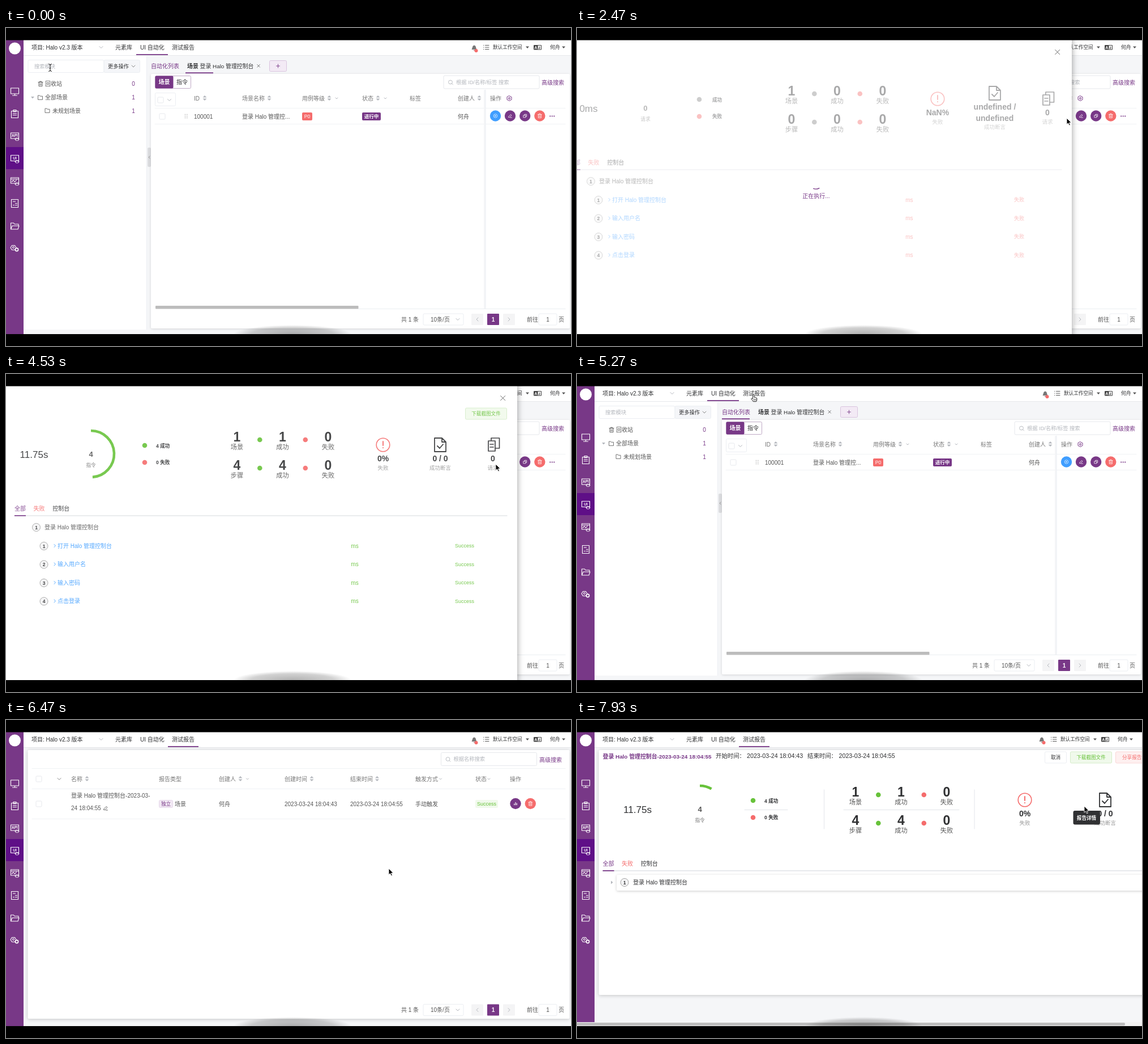
An HTML page that plays this animation: 998x561 px, repeating every 8 s.

```html
<!DOCTYPE html>
<html lang="zh-CN">
<head>
<meta charset="utf-8">
<title>UI 自动化</title>
<style>
html, body { margin: 0; height: 100%; overflow: hidden; background: #000; }
svg { display: block; width: 100vw; height: 100vh; font-family: "Liberation Sans", "Noto Sans CJK SC", "Noto Sans CJK", sans-serif; }
text { white-space: pre; }
</style>
</head>
<body>
<svg id="stage" viewBox="0 0 998 561"></svg>
<script>
const PURPLE = '#783887', RED = '#f56c6c', GREEN = '#67c23a', BLUE = '#409eff';
const DARK = '#303133', TEXT = '#555', HEAD = '#777', PALE = '#b4b7bd', LINE = '#ebeef2';
const MID = ' text-anchor="middle"', BOLD = ' font-weight="700"';
const USER = '何舟';

// Drawing helpers; text is placed by its vertical centre.
const text = (x, y, s, fill = TEXT, size = 10, more = '') =>
  `<text x="${x}" y="${y + size * .37}" fill="${fill}" font-size="${size}"${more}>${s}</text>`;
const rect = (x, y, w, h, fill, stroke = 'none', r = 0, more = '') =>
  `<rect x="${x}" y="${y}" width="${w}" height="${h}" rx="${r}" fill="${fill}" stroke="${stroke}" ${more}/>`;
const dot = (x, y, r, fill, stroke = 'none', w = 1) =>
  `<circle cx="${x}" cy="${y}" r="${r}" fill="${fill}" stroke="${stroke}" stroke-width="${w}"/>`;
const line = (d, stroke = LINE, w = 1) =>
  `<path d="${d}" fill="none" stroke="${stroke}" stroke-width="${w}" stroke-linecap="round" stroke-linejoin="round"/>`;
const at = (x, y, s) => `<g transform="translate(${x} ${y})">${s}</g>`;
const group = (id, s) => `<g id="${id}">${s}</g>`;
const fillPath = (d, fill) => `<path d="${d}" fill="${fill}"/>`;

const chevron = (x, y, c = PALE, r = 3) => line(`M${x - r} ${y - r / 2}l${r} ${r}l${r} ${-r}`, c);
const caret = (x, y) => fillPath(`M${x - 3} ${y - 1.5}h6l-3 3.5z`, '#555');
const sort = (x, y) => fillPath(`M${x - 3.5} ${y - 1}l3.5 -3.5l3.5 3.5zM${x - 3.5} ${y + 1}l3.5 3.5l3.5 -3.5z`, PALE);
const check = (x, y) => rect(x - 5, y - 5, 10, 10, '#fff', '#e6e8ec', 1.5);
const glass = (x, y) => dot(x, y, 3.4, 'none', PALE, .9) + line(`M${x + 2.5} ${y + 2.5}l2 2`, PALE, .9);
const trash = (c, w = .9) => line('M-4 -2.8h8M-1.5 -2.8v-1.5h3v1.5M-3 -2.8v7h6v-7M-1 -.5v2.6M1 -.5v2.6', c, w);
const folder = c => line('M-4 3.5v-7h3l1 1.3h4v5.7z', c, .9);
const pencil = c => line('M-3 1.2l4.2-4.2l1.8 1.8l-4.2 4.2h-1.8zM0 3.5h3.5', c, .9);
const copies = c => line('M-3 -1.2h4.5v4.5h-4.5zM-1 -1.2v-2h4.5v4.5h-2', c, .9);
const play = c => dot(0, 0, 3.8, 'none', c, .8) + fillPath('M-1 -1.8l2.8 1.8l-2.8 1.8z', c);
const bars = c => line('M-2.6 2.6v-2M0 2.6v-5M2.6 2.6v-3.2', c, 1.4);
const button = (x, y, c, icon) => at(x, y, dot(0, 0, 9.7, c) + `<g transform="scale(.85)">${icon('#fff')}</g>`);
const field = (x, y, w, hint) => rect(x, y, w, 23, '#fff', '#e6e8ec', 2) + glass(x + 12, y + 11.5) +
  text(x + 22, y + 11.5, hint, PALE, 9.25);
const heads = (y, list) => list.map(([x, s]) => text(x, y, s, HEAD, 10, ' font-weight="500"')).join('');

function sidebar() {
  const win = 'M-7 -6h14v10h-14zM-7 -3.5h14', code = 'M3 3l-2.5 2.3l2.5 2.3M5 3l2.5 2.3l-2.5 2.3';
  const icons = [
    'M-7 -6h14v10h-14zM-4 7h8M0 4v3',
    'M-6 -5h12v12h-12zM-2.5 -7h5v3h-5zM-3 -1h6M-3 2h6',
    win + code, win + code,
    win + 'M-5 1l2.5 -2.5l2.5 3l3 -3.5' + code,
    'M-6 -7h12v14h-12zM-3 -3.5h4M-3 3h2M1 0h3M1 3h3',
    'M-7 6v-11h5l1.5 2h7v3M-7 6l2.5 -6h12l-2 6z',
    'M-5 -5h5l2.5 4l-2.5 4h-5l-2.5 -4z'
  ];
  const tags = [, , 'API', 'UI'];
  return rect(0, 21, 31, 519, PURPLE) + rect(0, 210, 31, 39, '#5f0f87') + dot(15.5, 36, 10.5, '#fff') +
    icons.map((d, i) => at(15.5, 112 + i * 39.5, line(d, '#fff', 1.1) +
      (tags[i] ? rect(-6, -4.5, 12, 6, i === 3 ? '#5f0f87' : PURPLE) + text(0, -1, tags[i], '#fff', 6.5, MID + BOLD) : ''))).join('') +
    dot(13, 387, 1.6, 'none', '#fff') + dot(19, 391, 2.6, 'none', '#fff', 1.6);
}

function header() {
  const account = at(827, 35, fillPath('M-4.5 3c1.5-2 1-7 4.5-7.5c3.5.5 3 5.5 4.5 7.5zM-1.5 4h3l-1.5 1.5z', '#777') + dot(3.5, 5, 3, RED)) +
    line('M846.5 30.5h6.5M846.5 34h6.5M846.5 37.5h6.5M843.5 30.5h.4M843.5 34h.4M843.5 37.5h.4', '#555') +
    text(860, 34, '默认工作空间', DARK, 8.6) + caret(921, 34) +
    rect(932, 30, 14, 8.5, '#444', 'none', 1) + text(935.8, 34.3, 'A', '#fff', 7, MID + BOLD) +
    rect(939.5, 31, 5.5, 6.5, '#fff') + text(942.3, 34.3, 'Z', '#444', 6, MID + BOLD) +
    text(961, 34, USER, DARK, 8.8) + caret(985, 34);
  return rect(31, 21, 967, 27.5, '#fff') + line('M31 48.5h967', '#e6e8eb') +
    text(45, 34.5, '项目: Halo v2.3 版本', DARK) + chevron(168, 34) +
    text(193, 34, '元素库', DARK) + text(237, 34, 'UI 自动化', DARK) + text(293, 34, '测试报告', DARK) +
    `<rect id="navLine" y="46" height="1.8" fill="${PURPLE}"/>` + group('account', account);
}

function pager(y) {
  return at(0, y, text(698, 0, '共 1 条') + rect(737, -10, 71, 20, '#fff', LINE, 2) + text(750, 0, '10条/页') + chevron(798, 0) +
    rect(822, -10, 21, 20, '#f4f4f5', 'none', 1) + line('M834 -3l-3 3l3 3', PALE) +
    rect(850, -10, 21, 20, PURPLE, 'none', 1) + text(860.5, 0, '1', '#fff', 10, MID + BOLD) +
    rect(878, -10, 21, 20, '#f4f4f5', 'none', 1) + line('M887 -3l3 3l-3 3', PALE) +
    text(920, 0, '前往') + rect(941, -10, 32, 20, '#fff', LINE, 2) + text(957, 0, '1', TEXT, 10, MID) + text(976, 0, '页'));
}

function listPage() {
  const tree = rect(31, 49, 217, 483, '#fff') + line('M248.5 49v483') +
    rect(39, 56.5, 134, 22, '#fff', LINE, 2) + text(50, 67.5, '搜索模块', PALE, 9.25) +
    rect(173, 56.5, 63.5, 22, '#f5f6f9', LINE, 2) + text(180, 67.5, '更多操作', DARK, 9.25) + chevron(225, 67.5, '#888') +
    at(61, 98.5, trash('#555')) + text(69, 98.5, '回收站') + fillPath('M44 121h6l-3 3.5z', PALE) +
    at(60.5, 122.5, folder('#666')) + text(69, 122.5, '全部场景') + at(73, 145.5, folder('#666')) + text(82, 146, '未规划场景') +
    [[98.5, 0], [122.5, 1], [146, 1]].map(([y, n]) => text(225, y, n, PURPLE, 10, MID)).join('') +
    rect(250, 211, 6, 34, '#dcdde0', 'none', 2) + line('M254 226l-2 2l2 2', '#999');
  const top = text(256, 67, '自动化列表', PURPLE, 10, ' font-weight="500"') +
    text(320, 67, `<tspan font-weight="700">场景</tspan> 登录 Halo 管理控制台`, DARK, 9.9) +
    line('M443.8 64.5l4.6 4.6m0 -4.6l-4.6 4.6', '#666', .9) +
    rect(465.5, 57.5, 30, 19, '#f3eaf5', '#d9c4de', 2) + line('M477.5 67h6M480.5 64v6', PURPLE, .9);
  const table = rect(256, 81, 740, 449, '#fff', 'none', 2, 'style="filter:drop-shadow(0 1px 2px #0002)"') +
    `<rect id="tabLine" y="78.3" width="49" height="1.8" fill="${PURPLE}"/>` +
    rect(263.5, 84.5, 63, 22, '#fff', '#bfaac5', 2) + rect(263.5, 84.5, 32, 22, PURPLE, 'none', 2) +
    text(269.5, 95.5, '场景', '#fff', 10, BOLD) + text(301, 95.5, '指令', DARK) +
    field(773, 84, 169, '根据 ID/名称/标签 搜索') + text(946, 96.5, '高级搜索', PURPLE) +
    rect(263.5, 114.5, 36, 23, '#fff', LINE, 2) + check(273, 127) + chevron(288.5, 127) +
    heads(124, [[332, 'ID'], [417, '场景名称'], [523, '用例等级'], [629, '状态'], [713, '标签'], [798, '创建人'], [855, '操作']]) +
    [351, 465, 571, 657, 836].map(x => sort(x, 123.5)).join('') + chevron(584, 124, PALE, 2) + chevron(670, 124, PALE, 2) +
    line('M889 119.7l4 2.2v4.4l-4 2.2l-4 -2.2v-4.4z', PURPLE) + dot(889, 124.1, 1.5, 'none', PURPLE) +
    line('M263 141.5h725M263 169.5h725', '#f0f2f5') + check(276, 156) +
    [0, 1, 2].map(i => dot(316.5, 152.5 + i * 3, .8, '#aaa') + dot(319.8, 152.5 + i * 3, .8, '#aaa')).join('') +
    text(332, 156, '100001') + text(417, 156, '登录 Halo 管理控...') +
    rect(523, 149, 18, 14, RED, 'none', 2) + text(532, 156, 'P0', '#fff', 8.5, MID) +
    rect(629, 149, 33, 14, PURPLE, 'none', 2) + text(645.5, 156, '进行中', '#fff', 8.5, MID + BOLD) + text(798, 156, USER) +
    rect(844, 109, 3, 386, '#f4f5f7') + line('M847 109v386', LINE) +
    button(864.5, 155, BLUE, play) + button(890.5, 155, PURPLE, pencil) + button(916.7, 155, PURPLE, copies) + button(942.8, 155, RED, trash) +
    [-3.5, 0, 3.5].map(d => dot(964.7 + d, 155.5, 1.1, PURPLE)).join('') +
    line('M622 495.5h366') + rect(264, 490, 358.5, 5.5, '#bcbcbc', 'none', 1) + pager(514);
  return tree + top + table;
}

function reportPage() {
  return rect(38.5, 53, 957, 474, '#fff', 'none', 2, 'style="filter:drop-shadow(0 1px 3px #0003)"') +
    field(768.5, 57.5, 169, '根据名称搜索') + text(942, 70, '高级搜索', PURPLE) + line('M46 85.5h942M46 121.5h942M46 174.5h942', '#f0f2f5') +
    check(58, 104) + chevron(94, 104, '#888') + check(58, 148) +
    heads(104, [[115, '名称'], [270, '报告类型'], [376, '创建人'], [492, '创建时间'], [608, '结束时间'], [723, '触发方式'], [829, '状态'], [890, '操作']]) +
    [143, 414, 540, 655.5].map(x => sort(x, 103.5)).join('') + [426.5, 767.5, 853].map(x => chevron(x, 104, PALE, 2)).join('') +
    text(115, 133.5, '登录 Halo 管理控制台-2023-03-') + text(115, 155.5, '24 18:04:55') + at(176, 155.5, pencil('#555')) +
    rect(270.5, 141.5, 24, 13, '#f2e9f4', '#e6d7ea', 2) + text(282.5, 148, '独立', PURPLE, 8.6, MID) + text(298, 148, '场景') +
    text(376, 148, USER) + text(492, 148, '2023-03-24 18:04:43') + text(608, 148, '2023-03-24 18:04:55') + text(723, 148, '手动触发') +
    rect(829, 141, 40, 14, '#f0f9eb', 'none', 2) + text(849, 148, 'Success', GREEN, 9, MID) +
    button(900, 147.5, PURPLE, bars) + button(926.3, 147.5, RED, trash) + pager(511.5);
}

// Summary strip shared by the drawer and the report; y is the middle of the ring.
function summary(y, [xTime, xRing, xKey, xStat, xFail, xFile], v) {
  const mark = v.total ? GREEN : '#888';
  const stat = (x, dy, n, label) => text(x, y + dy, n, DARK, 23, MID + BOLD) + text(x, y + dy + 19, label, TEXT, 11.2, MID);
  const row = (dy, all, name) => stat(xStat, dy, all, name) + stat(xStat + 80.5, dy, v.total && all, '成功') + stat(xStat + 161, dy, 0, '失败') +
    dot(xStat + 40.3, y + dy + 6, 4.3, mark) + dot(xStat + 120.8, y + dy + 6, 4.3, RED);
  const note = (x, dy, s) => text(x, y + dy, s, '#999', 9.5, MID);
  const big = (x, dy, s) => text(x, y + dy, s, DARK, 14, MID + BOLD);
  return text(xTime, y + .5, v.time, DARK, 17, MID) + text(xRing, y, v.total, TEXT, 13, MID + BOLD) + text(xRing, y + 19.5, v.unit, '#777', 8.6, MID) +
    dot(xKey, y - 15, 4.3, mark) + dot(xKey, y + 15, 4.3, RED) + text(xKey + (v.total ? 20 : 23), y - 14.5, v.good, DARK, 8.6, BOLD) +
    text(xKey + (v.total ? 20 : 23), y + 15, v.bad, DARK, 8.6, BOLD) + row(-31, 1, '场景') + row(19, v.steps, '步骤') +
    at(xFail, y - 16, dot(0, 0, 11.8, 'none', RED, 1.6) + line('M0 -6v7M0 5v.3', RED, 2)) + big(xFail, 8, v.rate) + note(xFail, 24, '失败') +
    at(xFile, y - (v.total ? 16 : 26), line('M-10 -12h13l7 7v17h-20zM3 -12v7h7M-5 2l4 4l6 -7', DARK, 1.8)) +
    v.asserts.map((s, i) => big(xFile, i * 20 + (v.total ? 8 : -2), s)).join('') + note(xFile, v.total ? 24 : 33, '成功断言');
}

const ringPath = (x, y) => `<path class="ring" data-x="${x}" data-y="${y}" fill="none" stroke="${GREEN}" stroke-width="4.6"/>`;
const badge = (x, y, n) => dot(x, y, 7, '#f4f4f5', '#999', .9) + text(x, y, n, DARK, 8.5, MID + BOLD);
const tabs = (x, y, w) => text(x, y, '全部', PURPLE) + text(x + 33.5, y, '失败', RED) + text(x + 67.3, y, '控制台', DARK) +
  line(`M${x} ${y + 13}h${w}`, '#dfe2e6', 1.5) + rect(x, y + 12, 20, 1.8, PURPLE);
const DONE = { time: '11.75s', total: 4, unit: '指令', good: '4 成功', bad: '0 失败', steps: 4, rate: '0%', asserts: ['0 / 0'] };
const WAIT = { time: '0ms', total: 0, unit: '请求', good: '成功', bad: '失败', steps: 0, rate: 'NaN%', asserts: ['undefined /', 'undefined'] };

function drawerBody(v) {
  const steps = ['打开 Halo 管理控制台', '输入用户名', '输入密码', '点击登录'];
  return summary(141, [49.5, 150, 245, 408, 666, 767], v) +
    line('M852 118h12v18h-12zM857 118v-5h14.5v18h-7M855 124h6M855 129h6', DARK, 1.7) +
    text(860, 149, 0, DARK, 14, MID + BOLD) + text(860, 165, '请求', '#999', 9.5, MID) +
    tabs(15, 237, 870) + badge(53.5, 270.5, 1) + text(68, 270, '登录 Halo 管理控制台') +
    steps.map((s, i) => {
      const y = 303 + i * 32.5;
      return badge(67, y + .5, i + 1) + line(`M85 ${y - 2.5}l2.5 2.5l-2.5 2.5`, BLUE) + text(91, y, s, BLUE) +
        text(616, y, 'ms', v.total ? GREEN : RED, 10, MID) + text(810, y, v.total ? 'Success' : '失败', v.total ? GREEN : RED, 9, MID);
    }).join('') + (v.total ? ringPath(150, 141) + greenButton(811, 60) : '');
}
function greenButton(x, y) {
  return rect(x + .5, y, 73, 20, '#f0f9eb', '#d5ecc9', 2) + text(x + 37, y + 10, '下载截图文件', GREEN, 8.6, MID);
}

function detailPage() {
  const date = '2023-03-24 18:04:';
  return rect(38.5, 53, 980, 432, '#fff', 'none', 2, 'style="filter:drop-shadow(0 1px 3px #0003)"') +
    text(45.5, 64, `登录 Halo 管理控制台-${date}55`, PURPLE, 9.9, BOLD) +
    text(245, 63.5, '开始时间：', DARK, 10.4) + text(300, 63.5, date + 43, DARK, 10.7) +
    text(407, 63.5, '结束时间：', DARK, 10.4) + text(462.5, 63.5, date + 55, DARK, 10.7) +
    rect(826.5, 56, 38, 20, '#fff', LINE, 2) + text(845.5, 66, '取消', DARK, 8.6, MID) + greenButton(871, 56) +
    rect(951.5, 56, 60, 20, '#fef0f0', '#fad6d6', 2) + text(963, 66, '分享报告', RED, 8.6) +
    line('M296 158.5h76M471 158.5h204M436.5 123v69M702 123v69', '#e2e5ea') +
    summary(157, [107, 217, 311, 492, 791, 933], DONE) + ringPath(217, 157) + tabs(45.5, 253, 953) +
    rect(70, 273, 940, 28, '#fff', 'none', 2, 'style="filter:drop-shadow(0 1px 2px #0003)"') +
    fillPath('M60 283.5l3.5 3l-3.5 3z', PALE) + badge(84, 286.5, 1) + text(99, 286.5, '登录 Halo 管理控制台', DARK) +
    rect(0, 533, 998, 7, '#f1f1f1') + rect(0, 534, 968, 5, '#bcbcbc', 'none', 2);
}

stage.innerHTML = `<defs><radialGradient id="dock"><stop offset="0" stop-color="#000" stop-opacity=".3"/>
  <stop offset=".7" stop-color="#000" stop-opacity=".18"/><stop offset="1" stop-color="#000" stop-opacity="0"/></radialGradient></defs>` +
  rect(0, 21, 998, 519, '#f5f6f8') + header() + group('list', listPage()) + group('report', reportPage()) + sidebar() + group('detail', detailPage()) +
  group('drawer', rect(-20, 10, 923, 540, '#fff', 'none', 0, 'style="filter:drop-shadow(0 0 6px #0006)"') +
    group('waiting', drawerBody(WAIT)) + group('finished', drawerBody(DONE)) +
    group('mask', rect(0, 21, 903, 519, '#fff')) +
    group('loading', `<circle id="spinner" r="12.6" fill="none" stroke="${PURPLE}" stroke-width="1.4" pathLength="125.6"/>` +
      text(451.5, 296.5, '正在执行...', PURPLE, 10, MID)) +
    line('M873.7 38.5l8 8m0 -8l-8 8', '#666')) +
  `<ellipse cx="506" cy="540" rx="104" ry="16" fill="url(#dock)"/>` +
  group('tip', rect(876.5, 160, 47.5, 24.5, DARK, 'none', 3) + text(900, 172.5, '报告详情', '#fff', 8.6, MID + BOLD)) +
  rect(0, 0, 998, 21.5, '#000') + rect(0, 540, 998, 21, '#000') +
  group('beam', line('M-2.5 -6.5q2.5 0 2.5 2v9q0 2-2.5 2M2.5 -6.5q-2.5 0-2.5 2M0 4.5q0 2 2.5 2M-1 1h2', '#222')) +
  group('arrow', '<path d="M0 0v11.2l2.6-2.4l1.9 4.2l1.9-.8l-1.9-4.1h3.6z" fill="#000" stroke="#fff" stroke-width=".9"/>') +
  group('hand', '<path d="M-1.6 1q0-1.4 1.2-1.4t1.2 1.4v4q3.2.2 4.8 1.4q.9 3-.9 6.2h-5.4q-1.4-2.6-3.7-4.8q.5-1.7 2.8-.1z" fill="#fff" stroke="#222"/>' +
    line('M2.2 8v2.5M.3 8v2.5M4 8v2.5', '#222', .7));

const el = id => document.getElementById(id);
const show = (id, on) => { el(id).style.display = on ? '' : 'none'; };
const clamp = p => Math.max(0, Math.min(1, p));
const smooth = p => p * p * (3 - 2 * p);
const out = p => 1 - (1 - p) ** 2.27;
const LOOP = 8000, OPEN = 2330, READY = 4270, CLOSE = 5200, REPORT = 5600, DETAIL = 7730;

// time, x, y, easing towards the next stop (none = jump)
const route = [
  [0, 78, 70], [1270, 668, 295], [1470, 668, 295, p => p], [1600, 822, 200, out], [1930, 865, 159],
  [CLOSE, 312, 36], [6400, 676, 262], [7130, 676, 262, smooth], [7500, 896, 152]
];
function pointer(t) {
  const i = route.findLastIndex(k => k[0] <= t), [t0, x, y, ease] = route[i];
  if (!ease) return [x, y];
  const [t1, x1, y1] = route[i + 1], p = ease((t - t0) / (t1 - t0));
  return [x + (x1 - x) * p, y + (y1 - y) * p];
}

function spin(t) {
  const e = 210 + .643 * (t - 2470), d = (e % 1500) / 750;
  const grow = smooth(clamp(d)), run = smooth(clamp(d - 1));
  const s = el('spinner');
  s.setAttribute('transform', `translate(451 271.5) rotate(${e * .18})`);
  s.setAttribute('stroke-dasharray', `${1 + 89 * grow} 200`);
  s.setAttribute('stroke-dashoffset', -40 * grow - 80 * run);
}

function ring(path, angle) {
  const { x, y } = path.dataset, a = Math.min(angle, 359.9) * Math.PI / 180, r = 41;
  path.setAttribute('d', `M${x} ${y - r}A${r} ${r} 0 ${+(a > Math.PI)} 1 ${+x + r * Math.sin(a)} ${y - r * Math.cos(a)}`);
}

function draw(t) {
  const inDrawer = t >= OPEN && t < CLOSE, isDetail = t >= DETAIL, isReport = t >= REPORT && !isDetail;
  show('list', t < REPORT);
  show('report', isReport);
  show('detail', isDetail);
  show('drawer', inDrawer);
  el('navLine').setAttribute('x', t < REPORT ? 230 : 286);
  el('navLine').setAttribute('width', t < REPORT ? 56 : 54);
  el('tabLine').setAttribute('x', 317 - 61 * clamp((t - 50) / 70));
  el('account').setAttribute('transform', `translate(${isDetail ? -6 : 0} 0)`);

  if (inDrawer) {
    el('drawer').setAttribute('transform', `translate(${-903 * (1 - out(clamp((t - 2237) / 300)))} 0)`);
    show('waiting', t < READY);
    show('finished', t >= READY);
    show('loading', t < READY);
    el('mask').setAttribute('opacity', .83 * (t < READY ? clamp((t - 2260) / 300) : 1 - clamp((t - READY) / 300)));
    spin(t);
  }
  const [inner, outer] = document.querySelectorAll('#finished .ring, #detail .ring').length === 2
    ? [document.querySelector('#finished .ring'), document.querySelector('#detail .ring')] : [];
  ring(inner, 360 * smooth(clamp((t - READY) / 530)));
  ring(outer, 30 * clamp((t - DETAIL) / 200));

  const [x, y] = pointer(t);
  const kind = t < 1270 ? 'beam' : (t >= 1800 && t < OPEN) || (t >= CLOSE && t < 6400) || (t >= 7400 && t < DETAIL) ? 'hand' : 'arrow';
  for (const id of ['beam', 'arrow', 'hand']) show(id, id === kind);
  el(kind).setAttribute('transform', `translate(${x} ${y})`);
  show('tip', t >= 7460);
}

function tick(now) {
  draw(now % LOOP);
  requestAnimationFrame(tick);
}
draw(0);
requestAnimationFrame(tick);
</script>
</body>
</html>
```
